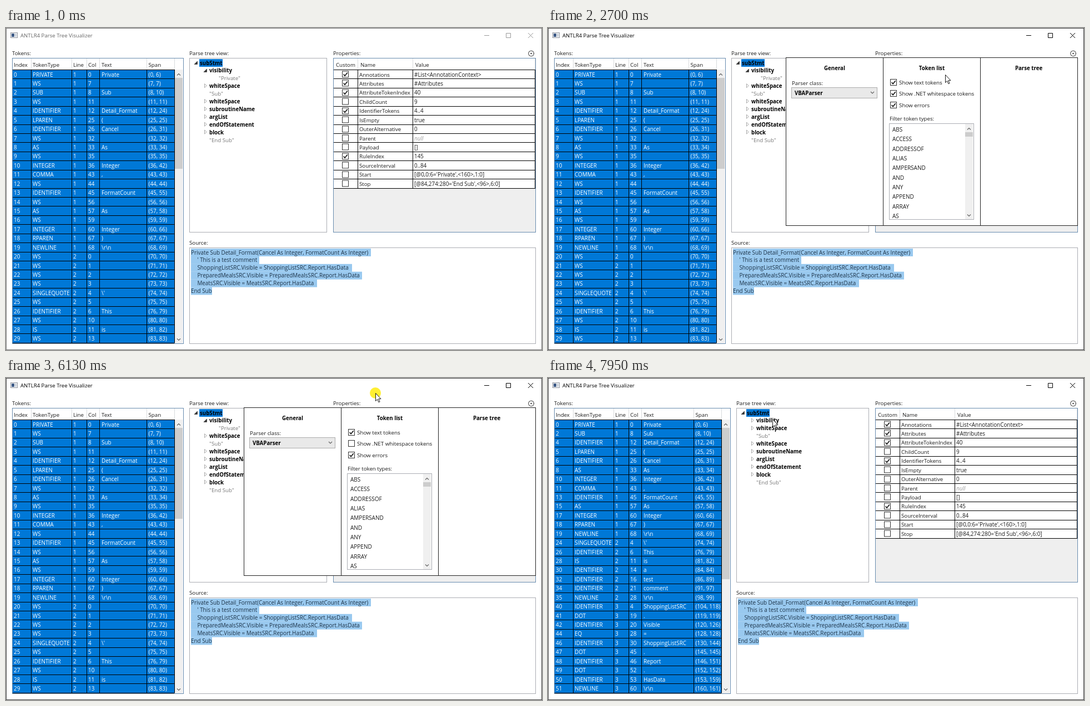
An HTML page for the animation above (8 s loop, 965x581 px).

```html
<!DOCTYPE html>
<html lang="en">
<head>
<meta charset="utf-8">
<title>Parse tree window</title>
<style>
html, body { margin: 0; width: 100%; height: 100%; overflow: hidden; background: #fff; }
svg { display: block; font-family: 'Open Sans', 'Noto Sans', sans-serif; }
</style>
</head>
<body>
<svg id="stage" width="965" height="581" viewBox="0 0 965 581"></svg>
<script>
const LOOP = 8000, ROW = 16.43, TOP = 75.5;
const BLUE = '#0078d7', GRID_BORDER = '#688caf', BOX_BORDER = '#abadb3';

// Drawing helpers
const rect = (x, y, w, h, fill, stroke = 'none', extra = '') =>
  `<rect x="${x}" y="${y}" width="${w}" height="${h}" fill="${fill}" stroke="${stroke}" ${extra}/>`;
const path = (d, stroke, width = 1, fill = 'none') =>
  `<path d="${d}" stroke="${stroke}" stroke-width="${width}" fill="${fill}"/>`;
const escape = s => String(s).replace(/&/g, '&amp;').replace(/</g, '&lt;');
// y is the middle of the text line
const text = (x, y, s, size = 9.7, fill = '#1c1c1c', extra = '') =>
  `<text x="${x}" y="${y + 3.5}" font-size="${size}" fill="${fill}" ${extra}>${escape(s)}</text>`;
const bold = (x, y, s, extra = '') => text(x, y, s, 9.7, '#000', `font-weight="700" ${extra}`);
const crisp = y => Math.floor(y) + .5;
const rowMiddle = i => 84 + i * ROW;
const chevron = (x, y, dir) => path(`M${x - 3} ${y + 1.5 * dir}l3 ${-3 * dir}l3 ${3 * dir}`, '#606060', 1.1);

function checkbox(x, y, checked, border = '#333', fill = '#fff') {
  const tick = checked ? path(`M${x - 3.4} ${y}l2.5 2.7l4.6 -5.6`, '#111', 1.6) : '';
  return rect(x - 5.5, y - 5.5, 11, 11, fill, border) + tick;
}

function scrollbar(x, top, bottom, thumbTop, thumbBottom) {
  return rect(x, top, 14, bottom - top, '#f0f0f0') +
    rect(x, thumbTop, 14, thumbBottom - thumbTop, '#cdcdcd') +
    chevron(x + 7, top + 9, 1) + chevron(x + 7, bottom - 7, -1);
}

function header(labels, xs, lines, left, right) {
  return rect(left, 55, right - left, 20, '#fff') +
    path(lines.map(x => `M${x}.5 55v20`).join(''), '#d8dadc') +
    labels.map((s, i) => text(xs[i], 66, s)).join('');
}

function gridLines(lines, left, right, count) {
  let d = '';
  for (let i = 0; i <= count; i++) d += `M${left} ${crisp(TOP + i * ROW)}H${right}`;
  for (const x of lines) d += `M${x}.5 75V${crisp(TOP + count * ROW)}`;
  return path(d, '#000');
}

// Token list, lexed from the code
const CODE = [
  'Private Sub Detail_Format(Cancel As Integer, FormatCount As Integer)',
  "    ' This is a test comment",
  '    ShoppingListSRC.Visible = ShoppingListSRC.Report.HasData',
  '    PreparedMealsSRC.Visible = PreparedMealsSRC.Report.HasData',
  '    MeatsSRC.Visible = MeatsSRC.Report.HasData',
  'End Sub'];
const SYMBOLS = { ' ': 'WS', '(': 'LPAREN', ')': 'RPAREN', ',': 'COMMA', '.': 'DOT',
  '=': 'EQ', "'": 'SINGLEQUOTE', '\r\n': 'NEWLINE' };
const KEYWORDS = ['PRIVATE', 'SUB', 'AS', 'INTEGER', 'IS', 'END'];

function lex() {
  let line = 1, start = 0;
  return [...CODE.join('\r\n').matchAll(/\r\n|\w+|./g)].map((m, index) => {
    const s = m[0], at = m.index, upper = s.toUpperCase();
    const type = SYMBOLS[s] || (KEYWORDS.includes(upper) ? upper : 'IDENTIFIER');
    const shown = { WS: '', NEWLINE: '\\r\\n', SINGLEQUOTE: "\\'" }[type] ?? s;
    const cells = [index, type, line, at - start, shown, `(${at}, ${at + s.length - 1})`];
    if (type === 'NEWLINE') { line++; start = at + s.length; }
    return cells;
  });
}

function tokenGrid(shift, tokens, thumbEnd) {
  const right = 303 + shift, span = 253 + shift;
  const xs = [14, 48, 121, 148, 172, span + 3.5], lines = [45, 118, 145, 168, span, right];
  let out = rect(11.5, 54.5, 308 + shift, 515, '#fff', GRID_BORDER) +
    header(['Index', 'TokenType', 'Line', 'Col', 'Text', 'Span'], xs, lines, 12, right + 16) +
    rect(12, 75, right - 12, 494, BLUE);
  tokens.slice(0, 30).forEach((cells, row) =>
    cells.forEach((c, i) => out += text(xs[i], rowMiddle(row), c, 9.9, '#fff')));
  return out + gridLines(lines, 12, right, 30) + scrollbar(right + 1, 75, 569, 90, thumbEnd);
}

// Tree rows: level, marker (- open, + closed, . leaf), label
const CHILDREN = ['1+whiteSpace', '1."Sub"', '1+whiteSpace', '1+subroutineName',
  '1+argList', '1+endOfStatement', '1+block', '1."End Sub"'];

function tree(x, rows) {
  let out = rect(x + .5, 54.5, 577 - x, 314, '#fff', BOX_BORDER) + rect(x + 18, 56, 42, 14, BLUE);
  rows.forEach((row, i) => {
    const tx = x + 19 + row[0] * 17, y = 63 + i * 13.9, label = row.slice(2);
    if (row[1] === '.') { out += text(tx, y, label, 9.7, '#777'); return; }
    out += bold(tx, y, label) + (row[1] === '-'
      ? path(`M${tx - 4.5} ${y - 3}v5.5h-5.5z`, '#222', .6, '#333')
      : path(`M${tx - 8.5} ${y - 4}l3.8 3.5l-3.8 3.5z`, '#a0a0a0', .9, '#fff'));
  });
  return out;
}

const SELECTED = [324, 123, 290, 308, 227, 38];
function codeBox(x) {
  let out = rect(x + .5, 396.5, 953 - x, 173, '#fff', BOX_BORDER);
  CODE.forEach((s, i) => {
    const y = 405 + i * 13.9, indent = s[0] === ' ' ? 11.4 : 0;
    out += rect(x + 3, y - 7, SELECTED[i], 14, '#99c9ef') +
      text(x + 3 + indent, y, s.trim(), 9.9, '#1d3348');
  });
  return out;
}

const PROPERTIES = [
  ['Annotations', '#List<AnnotationContext>', 1], ['Attributes', '#Attributes', 1],
  ['AttributeTokenIndex', '40', 1], ['ChildCount', '9'], ['IdentifierTokens', '4..4', 1],
  ['IsEmpty', 'true'], ['OuterAlternative', '0'], ['Parent', 'null'], ['Payload', '[]'],
  ['RuleIndex', '145', 1], ['SourceInterval', '0..84'],
  ['Start', "[@0,0:6='Private',<160>,1:0]"], ['Stop', "[@84,274:280='End Sub',<96>,6:0]"]];

function propertyGrid() {
  const lines = [633, 732, 952];
  let out = rect(589.5, 54.5, 364, 314, '#efefef', GRID_BORDER) +
    header(['Custom', 'Name', 'Value'], [594, 638, 737], lines, 590, 953) +
    rect(590, 75, 363, 13 * ROW, '#fff');
  PROPERTIES.forEach(([name, value, on], i) => {
    const y = rowMiddle(i), empty = value === 'null';
    out += checkbox(611, Math.round(y) - .5, on) + text(636, y, name) +
      text(735, y, value, 9.9, empty ? '#999' : '#1c1c1c', empty ? 'font-style="italic"' : '');
  });
  return out + gridLines(lines, 590, 953, 13);
}

function view(shift, tokens, rows, thumbEnd) {
  const x = 330 + shift;
  return tokenGrid(shift, tokens, thumbEnd) + tree(x, rows) + codeBox(x) +
    text(x, 45, 'Parse tree view:') + text(x, 387, 'Source:');
}

function titleBar(color, titleColor, border) {
  return rect(.5, .5, 964, 580, 'none', border) +
    text(26, 13.5, 'ANTLR4 Parse Tree Visualizer', 9.65, titleColor) +
    path('M861 13.5h9M900.5 9.5h8v8h-8zM940 9l9 9M949 9l-9 9', color);
}

const OPTIONS = [['Show text tokens', 98, 95], ['Show .NET whitespace tokens', 118.5, 152], ['Show errors', 139.5, 72]];
const TYPES = ['ABS', 'ACCESS', 'ADDRESSOF', 'ALIAS', 'AMPERSAND', 'AND', 'ANY', 'APPEND', 'ARRAY', 'AS'];

function settings() {
  const title = (x, s) => bold(x, 72, s, 'text-anchor="middle"');
  return rect(428.5, 53.5, 525, 303, '#fff', '#222') + path('M603.5 54v303M778.5 54v303', '#222') +
    title(516, 'General') + title(691, 'Token list') + title(865.5, 'Parse tree') +
    text(439, 99, 'Parser class:') + rect(438.5, 107.5, 154, 19, '#e9e9e9', '#acacac') +
    bold(444, 117.5, 'VBAParser') + chevron(584, 116.5, -1) +
    OPTIONS.map(([s, y]) => text(632, y, s, 9.8)).join('') +
    text(615, 163.5, 'Filter token types:') + rect(614.5, 172.5, 152, 173, '#fff', BOX_BORDER) +
    `<g clip-path="url(#list)">${TYPES.map((s, i) => text(620, 183.5 + i * 17.35, s, 10)).join('')}</g>` +
    scrollbar(751, 173, 345, 188, 196);
}

const group = (id, content) => `<g id="${id}">${content}</g>`;
const tokens = lex();
const stage = document.getElementById('stage');
stage.innerHTML = `<clipPath id="list">${rect(615, 173, 136, 172, '#000')}</clipPath>` +
  rect(0, 0, 965, 581, '#fff') +
  rect(8.5, 8.5, 12, 9, '#fff', '#8a8f98') + rect(10, 10, 5, 6, '#3d5a86') + rect(16, 10, 3, 6, '#c9d0da') +
  group('idle', titleBar('#999', '#666', '#777')) + group('active', titleBar('#000', '#000', '#444')) +
  text(11, 45, 'Tokens:') + text(589, 45, 'Properties:') +
  '<circle cx="945.5" cy="46" r="4.8" fill="none" stroke="#444" stroke-width="1.3" stroke-dasharray="1.9 .6"/>' +
  '<circle cx="945.5" cy="46" r="1.3" fill="#444"/>' +
  propertyGrid() +
  group('before', view(0, tokens, ['0-subStmt', '1-visibility', '2."Private"', ...CHILDREN], 254)) +
  group('after', view(9, tokens.filter(c => c[1] !== 'WS'), ['0-subStmt', '1+visibility', ...CHILDREN], 363)) +
  group('hover', rect(330.5, 396.5, 623, 173, 'none', '#7eb4ea')) +
  group('panel', settings() + group('checks', '')) +
  group('pointer', '<circle id="click" r="10" fill="#ffeb00" fill-opacity=".8"/>' +
    path('M.5 .5V14.5L3.7 11.5L5.9 16.7L8 15.8L5.8 10.7H10Z', '#000', .9, '#fff'));

const el = {};
for (const g of stage.querySelectorAll('[id]')) el[g.id] = g;
const show = (id, on) => el[id].setAttribute('visibility', on ? 'inherit' : 'hidden');

// Pointer moves: start, steps of 80 ms, from, to, ease-out powers for x and y
const STEP = 80;
const MOVES = [
  [500, 3, [985, 500], [900, 470], 1, 1],
  [1210, 6, [960, 260], [948, 43], 1, 1.6],
  [2390, 10, [948, 43], [661, 116], 2.4, 1.18],
  [5030, 4, [661, 116], [665, 27], 1.5, 1.5],
  [7150, 8, [665, 27], [425, 85], 1.3, 1.3],
  [7790, 3, [425, 85], [404, 74], 1.3, 1.3]];
const CLICKS = [[1690, 1840], [4110, 4260], [6130, 6290]];

function pointerAt(t) {
  const [start, steps, from, to, px, py] = MOVES.findLast(m => t >= m[0]) || MOVES[0];
  const u = Math.min(1, Math.max(0, Math.floor((t - start + 10) / STEP) + 1) / steps);
  return [px, py].map((p, i) => Math.round(from[i] + (to[i] - from[i]) * (1 - (1 - u) ** p)));
}

function draw(t) {
  const [x, y] = pointerAt(t);
  const clicking = CLICKS.some(([a, b]) => t >= a && t < b);
  const entering = t >= 500 && t < 830;
  show('idle', t < 1210);
  show('active', t >= 1210);
  show('before', t < 6760);
  show('after', t >= 6760);
  show('hover', entering && x < 954);
  show('panel', t >= 1840 && t < 6210);
  show('pointer', entering || t >= 1210);
  show('click', clicking);
  el.pointer.setAttribute('transform', `translate(${x} ${y})`);
  el.checks.innerHTML = OPTIONS.map(([, cy, w], i) => {
    const over = x >= 616 && x < 616 + w && Math.abs(y - cy) < 7;
    return checkbox(622, Math.floor(cy), i !== 1 || t < 4260,
      over ? BLUE : '#333', over && clicking ? '#cce4f7' : '#fff');
  }).join('');
}

function tick(now) {
  draw(now % LOOP);
  requestAnimationFrame(tick);
}
draw(0);
requestAnimationFrame(tick);
</script>
</body>
</html>
```
